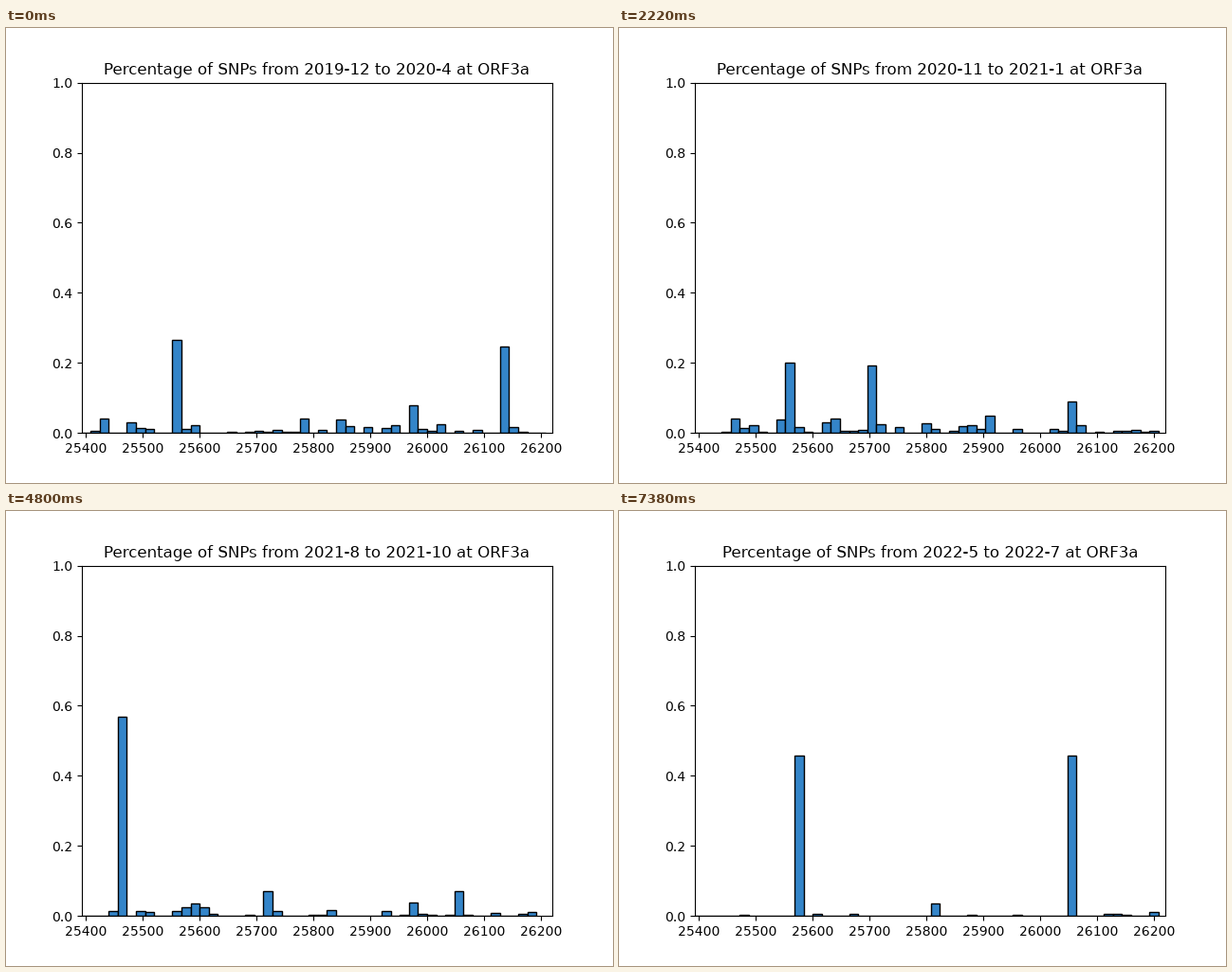
These frames come from a looping animation (640x480 px, 8000 ms). A matplotlib script:

```python
import matplotlib.pyplot as plt
import numpy as np
from matplotlib.animation import FuncAnimation
from matplotlib.collections import PolyCollection

LOOP_MS, STEP_MS = 8000, 20
FIRST_MS, HOLD_MS = 500, 860
GENE = (25393, 26220)
BIN = 16
FIRST_EDGE = GENE[0] // BIN * BIN
N_BINS = -(-(GENE[1] - FIRST_EDGE) // BIN)

# For each period: the dominant sites with their share, and how many
# other bins split the remainder.
PERIODS = [
    ({25563: 0.265, 26143: 0.246, 25979: 0.079, 25785: 0.041}, 30),
    ({25672: 0.254, 26028: 0.238, 25563: 0.19, 25832: 0.063}, 14),
    ({25413: 1.0}, 0),
    ({25563: 0.201, 25710: 0.192, 26060: 0.09, 25907: 0.049, 25469: 0.041}, 40),
    ({25469: 0.2, 25563: 0.18, 25710: 0.12, 26060: 0.09}, 36),
    ({25469: 0.622, 26060: 0.076, 25720: 0.073}, 29),
    ({25469: 0.57, 25720: 0.07, 26060: 0.07}, 30),
    ({25469: 0.354, 25583: 0.29, 25720: 0.057, 26060: 0.043}, 30),
    ({25583: 0.42, 26060: 0.3, 25469: 0.12}, 20),
    ({25583: 0.457, 26060: 0.457}, 13),
]


def bin_heights(index):
    """Share of SNPs per bin, ending at the last bin in use."""
    sites, n_minor = PERIODS[index]
    heights = np.zeros(N_BINS)
    for site, share in sites.items():
        heights[(site - FIRST_EDGE) // BIN] = share
    if n_minor:
        rng = np.random.default_rng(index)
        free = np.flatnonzero(heights[1:-1] == 0) + 1
        minor = rng.choice(free, n_minor, replace=False)
        weights = rng.exponential(size=n_minor)
        heights[minor] = (1 - heights.sum()) * weights / weights.sum()
    return np.trim_zeros(heights, "b")


def bar_corners(heights):
    lefts = FIRST_EDGE + BIN * np.arange(len(heights))
    return [[(x, 0), (x + BIN, 0), (x + BIN, h), (x, h)]
            for x, h in zip(lefts, heights)]


def month_name(month):
    """Year and month for a count of months since January 2019."""
    return f"{2019 + month // 12}-{month % 12 + 1}"


def period_title(index):
    end = 15 + 3 * index
    start = end - 2 if index else 11
    return (f"Percentage of SNPs from {month_name(start)} "
            f"to {month_name(end)} at ORF3a")


# Keep letter heights and widths close to their true size.
plt.rcParams.update({"text.hinting": "native", "text.hinting_factor": 9})

fig, ax = plt.subplots(figsize=(6.4, 4.8), dpi=100)
ax.set_xlim(*GENE)
ax.set_ylim(0, 1)
bars = PolyCollection([], facecolor="#3485c9", edgecolor="black",
                      linewidth=1, joinstyle="miter")
ax.add_collection(bars, autolim=False)
title = ax.set_title("")

scenes = [(bar_corners(bin_heights(i)), period_title(i))
          for i in range(len(PERIODS))]


def update(frame):
    t = frame * STEP_MS
    index = 0 if t < FIRST_MS else 1 + (t - FIRST_MS) // HOLD_MS
    corners, text = scenes[index]
    bars.set_verts(corners)
    title.set_text(text)
    return bars, title


anim = FuncAnimation(fig, update, frames=LOOP_MS // STEP_MS,
                     interval=STEP_MS, repeat=True, repeat_delay=0)
plt.show()
```
